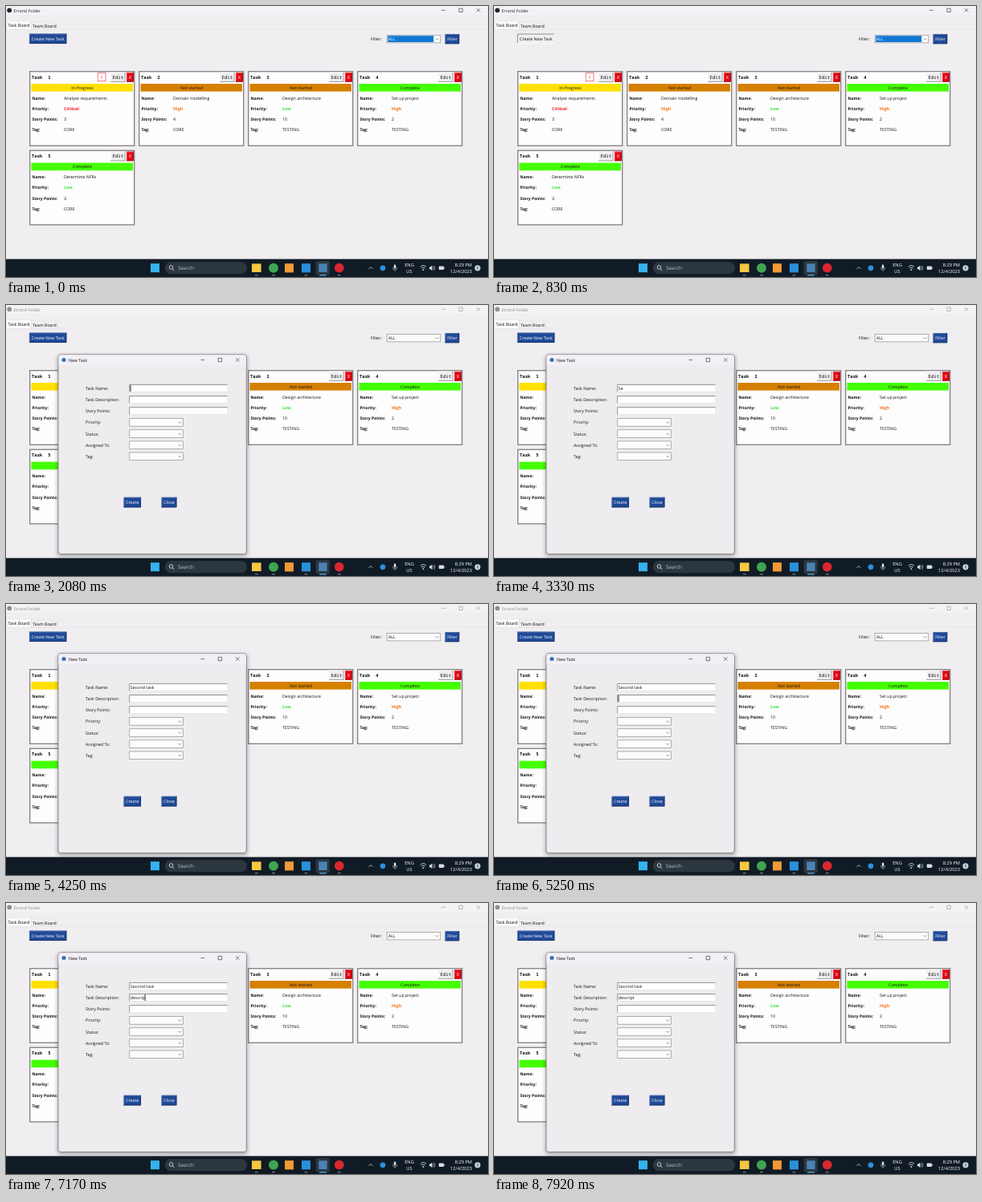
An HTML page for the animation above (8 s loop, 600 by 338 pixels).

```html
<!DOCTYPE html>
<html lang="en">
<head>
<meta charset="utf-8">
<title>Task board</title>
<style>
  html, body { margin: 0; width: 100%; height: 100%; overflow: hidden; background: #f0eef0; }
  svg { display: block; width: 100vw; height: 100vh; }
  text { font: 5.3px "Open Sans", "Noto Sans", sans-serif; white-space: pre; text-rendering: geometricPrecision; }
  .bold { font-weight: 700; }
  .label { font-weight: 700; font-size: 5.05px; }
  .mono { font: 5.7px "Noto Sans Mono", "DejaVu Sans Mono", monospace; }
  .head { font: 700 5.6px "Noto Sans Mono", "DejaVu Sans Mono", monospace; }
  .tray { font-size: 5.7px; }
  .search { font-size: 6.3px; }
</style>
</head>
<body>
<svg id="stage" viewBox="0 0 600 338"></svg>
<script>
const LOOP = 8000;
const BLUE = '#204a98', PANEL = '#f0eef0';
const STATUS = { 'In Progress': '#ffe000', 'Not started': '#d68000', 'Complete': '#44ff00' };
const PRIORITY = { Critical: '#f5141c', High: '#f47216', Low: '#3be03b' };

const rect = (x, y, w, h, fill, extra = '') =>
  `<rect x="${x}" y="${y}" width="${w}" height="${h}" fill="${fill}" ${extra}/>`;
const circle = (x, y, r, fill) => `<circle cx="${x}" cy="${y}" r="${r}" fill="${fill}"/>`;
const line = (d, color, width = 0.6) =>
  `<path d="${d}" fill="none" stroke="${color}" stroke-width="${width}"/>`;
// y is the middle of the capitals
const text = (x, y, str, { fill = '#111', cls = '', anchor = 'start', id = '' } = {}) =>
  `<text x="${x}" y="${y + 1.9}" fill="${fill}" class="${cls}" text-anchor="${anchor}" id="${id}">${str}</text>`;

// Box with light and dark edges, raised or sunken
function bevel(x, y, w, h, fill, light, dark) {
  const r = x + w, b = y + h;
  return rect(x, y, w, h, fill) +
    line(`M${x + .4} ${b}V${y + .4}H${r}`, light, .8) +
    line(`M${x} ${b - .4}H${r - .4}V${y}`, dark, .8);
}

const blueButton = (x, y, w, h, str) =>
  bevel(x, y, w, h, BLUE, '#5b7ab5', '#132c5c') +
  text(x + w / 2, y + h / 2, str, { fill: '#fff', anchor: 'middle' });

const combo = (x, y, w) =>
  rect(x, y, w, 9.6, '#fdfcfd', 'stroke="#8f8f92" stroke-width=".7"') +
  line(`M${x + w - 6} ${y + 4}l1.8 1.8 1.8 -1.8`, '#555');

const windowControls = (x, y, color) =>
  line(`M${x - 2.3} ${y}h4.6`, color) +
  line(`M${x + 19.4} ${y - 2.2}h4.4v4.4h-4.4z`, color) +
  line(`M${x + 41.3} ${y - 2.2}l4.4 4.4m0 -4.4l-4.4 4.4`, color);

function card(index, [status, name, priority, points, tag]) {
  const x = 29 + index % 4 * 136, y = 81 + Math.floor(index / 4) * 98.6;
  const rows = [['Name:', name], ['Priority:', priority], ['Story Points:', points], ['Tag:', tag]];
  return rect(x + .7, y + .7, 130, 92.6, '#fefdfe', 'stroke="#88868a" stroke-width="1.4"') +
    text(x + 3, y + 7.7, `Task  ${index + 1}`, { cls: 'head' }) +
    (priority === 'Critical'
      ? rect(x + 85.2, y + 2.7, 9.8, 10, '#fff', 'stroke="#e85a60" stroke-width=".8"') +
        text(x + 90.1, y + 7.6, '!', { cls: 'bold', fill: '#f01820', anchor: 'middle' })
      : '') +
    bevel(x + 101, y + 1.8, 18.5, 12, PANEL, '#fff', '#8a888c') +
    text(x + 110.3, y + 7.6, 'Edit', { cls: 'mono', anchor: 'middle' }) +
    bevel(x + 121, y + 2, 8.8, 11.6, '#e30613', '#f0656c', '#8c0710') +
    text(x + 125.4, y + 7.6, 'X', { cls: 'mono', fill: '#fff', anchor: 'middle' }) +
    rect(x + 2.5, y + 16, 126.5, 9.6, STATUS[status]) +
    text(x + 66, y + 20.6, status, { anchor: 'middle' }) +
    rows.map(([label, value], i) => {
      const mid = y + 33.6 + i * 13.2;
      const color = PRIORITY[value];
      return text(x + 3.4, mid, label, { cls: 'label' }) +
        text(x + 43, mid, value, color ? { cls: 'bold', fill: color } : {});
    }).join('');
}

const tasks = [
  ['In Progress', 'Analyse requirements', 'Critical', 3, 'CORE'],
  ['Not started', 'Domain modelling', 'High', 4, 'CORE'],
  ['Not started', 'Design architecture', 'Low', 10, 'TESTING'],
  ['Complete', 'Set up project', 'High', 2, 'TESTING'],
  ['Complete', 'Determine NFRs', 'Low', 3, 'CORE'],
];

function titleBar(id, background, ink) {
  return `<g id="${id}">` + rect(0, 0, 600, 11, background) + circle(4.2, 5.3, 2.9, ink) +
    text(9.5, 5.6, 'Errand Folder', { fill: ink }) + windowControls(544.5, 5.3, ink) + '</g>';
}

const board =
  rect(0, 0, 600, 338, PANEL) +
  titleBar('titleActive', '#f1f3f9', '#222') +
  titleBar('titleInactive', '#f3f2f4', '#8c8c8e') +
  rect(.5, 28.7, 599, .5, '#dddbde') +
  rect(31, 20, 34, 9, PANEL, 'stroke="#dcdadd" stroke-width=".5"') +
  rect(.5, 18.2, 30.5, 11, '#fbfafb', 'stroke="#dcdadd" stroke-width=".5"') +
  text(2.6, 23.6, 'Task Board') + text(33.2, 24.6, 'Team Board') +
  `<g id="buttonUp">${blueButton(29, 34.6, 46.3, 12.4, 'Create New Task')}</g>` +
  `<g id="buttonDown">${bevel(29, 34.6, 46.3, 12.4, PANEL, '#77757a', '#fff')}` +
  text(52.4, 41.1, 'Create New Task', { anchor: 'middle' }) + '</g>' +
  text(454, 41, 'Filter:') + combo(474.2, 36.3, 66.6) +
  `<g id="selected">${rect(475.3, 37.2, 57, 7.8, '#0f78d4')}${text(476, 41, 'ALL', { fill: '#fff' })}</g>` +
  text(476, 41, 'ALL', { id: 'unselected' }) +
  blueButton(546.6, 35, 17.6, 12.2, 'Filter') +
  tasks.map((task, i) => card(i, task)).join('');

const fieldLabels = ['Task Name:', 'Task Description:', 'Story Points:', 'Priority:', 'Status:', 'Assigned To:', 'Tag:'];
const fieldY = i => 104 + i * 14.13;

const dialog = '<g id="dialog">' +
  rect(64, 62.5, 236.5, 251, '#000', 'rx="4" opacity=".3" filter="url(#soft)"') +
  rect(65, 61.8, 234.3, 248.8, '#eeecef', 'rx="3.2" stroke="#77757a" stroke-width=".8"') +
  '<path d="M65.4 75.5V65q0 -2.8 2.8 -2.8H296q2.9 0 2.9 2.8V75.5z" fill="#f2eff5"/>' +
  circle(72, 68.5, 2.5, '#2f6fb0') + text(78, 68.7, 'New Task') +
  windowControls(244.8, 68.5, '#222') +
  fieldLabels.map((label, i) => text(99, fieldY(i) + .2, label) + (i < 3
    ? bevel(153.3, fieldY(i) - 5, 122.9, 9.8, '#fff', '#77757a', '#e2e0e3') +
      text(154.8, fieldY(i), '', { id: 'entry' + i })
    : combo(153.8, fieldY(i) - 4.8, 66.8))).join('') +
  rect(0, 0, .9, 8, '#111', 'id="caret"') +
  blueButton(146.6, 239.8, 21.4, 12.6, 'Create') +
  blueButton(193.6, 239.8, 18.8, 12.6, 'Close') + '</g>';

const GREY = '#d9dee2';
const taskbar =
  rect(0, 315.6, 600, 22.4, '#101b25') +
  rect(180, 321.2, 11, 11, '#35b2ee') +
  rect(197.6, 319.2, 102.4, 15, '#2b363f', 'rx="7.5"') +
  `<circle cx="205.6" cy="326" r="2.3" fill="none" stroke="${GREY}" stroke-width=".9"/>` +
  line('M207.2 327.8l2.2 2.4', GREY, .9) +
  text(214, 326.9, 'Search', { cls: 'search', fill: '#c3c9ce' }) +
  rect(385.6, 318, 17.4, 17.6, '#2b3640', 'rx="2"') +
  rect(306, 321.4, 11.6, 10.6, '#f7c741') +
  circle(333, 326.8, 6, '#3fa552') +
  rect(347, 321.2, 11, 11.2, '#f29a34') +
  rect(368, 321.2, 11, 11.2, '#2990dc') +
  rect(389.3, 321.4, 10.4, 10.6, '#4a82b4') +
  circle(414.8, 326.6, 5.9, '#d9262f') +
  [311.8, 333, 373.5, 414.8].map(x => rect(x - 2, 335.3, 4, 1, '#8f989f', 'rx=".5"')).join('') +
  rect(390, 335.2, 9, 1.2, '#5cb6ea', 'rx=".6"') +
  line('M451.6 327.8l2.3 -2.3 2.3 2.3', GREY, .8) +
  circle(469, 326.8, 3.4, '#2b8fe0') +
  rect(482.8, 322.6, 2.6, 5, GREY, 'rx="1.3"') +
  line('M481.4 326.4q0 2.8 2.7 2.8t2.7 -2.8M484.1 329.2v1.6', GREY) +
  text(502, 323.4, 'ENG', { cls: 'tray', fill: '#fff', anchor: 'middle' }) +
  text(502, 331.2, 'US', { cls: 'tray', fill: '#fff', anchor: 'middle' }) +
  line('M515.8 325.4q3.6 -3.6 7.2 0M517.2 327.2q2.2 -2 4.4 0', GREY, .9) + circle(519.4, 329.2, .9, GREY) +
  `<path d="M527 325.4h1.5l2 -2v6.8l-2 -2H527z" fill="${GREY}"/>` +
  line('M531.8 325q1.2 1.8 0 3.6M533 323.8q2 3 0 6', GREY) +
  rect(538.8, 324.4, 6.2, 4.6, GREY, 'rx=".8"') + rect(545.4, 325.8, .8, 1.8, GREY) +
  text(580, 323.4, '8:29 PM', { cls: 'tray', fill: '#fff', anchor: 'end' }) +
  text(580, 331.2, '12/4/2023', { cls: 'tray', fill: '#fff', anchor: 'end' }) +
  circle(587, 326.8, 3.6, '#c5d3dc') + rect(586.6, 325, .9, 3.6, '#2a3740');

document.getElementById('stage').innerHTML =
  '<defs><filter id="soft" x="-10%" y="-10%" width="120%" height="120%"><feGaussianBlur stdDeviation="2.6"/></filter></defs>' +
  board + dialog + taskbar;

const PRESS = 700, OPEN = 1080;
// time, field with the caret (-1: none), text of that field
const typing = [
  [OPEN, 0, ''], [1900, 0, ''], [2540, 0, 'S'], [2700, 0, 'Se'],
  ...[...'cond task'].map((_, i) => [3400 + i * 80, 0, 'Second task'.slice(0, 3 + i)]),
  [4180, -1, ''], [4700, 1, ''],
  ...[5800, 5960, 6160, 6480, 6680, 6860, 7060, 7270].map((time, i) => [time, 1, 'descript'.slice(0, i + 1)]),
];

const el = id => document.getElementById(id);
const show = (id, on) => el(id).setAttribute('visibility', on ? 'visible' : 'hidden');

function render(t) {
  const open = t >= OPEN, pressed = t >= PRESS && !open;
  el('dialog').style.display = open ? '' : 'none';
  show('titleActive', !open);
  show('titleInactive', open);
  show('selected', !open);
  show('unselected', open);
  show('buttonUp', !pressed);
  show('buttonDown', pressed);

  const past = typing.filter(step => step[0] <= t);
  for (const field of [0, 1]) {
    const step = past.filter(s => s[1] === field).pop();
    el('entry' + field).textContent = step ? step[2] : '';
  }
  const [time, field] = past.at(-1) || [0, -1];
  const caretOn = open && field >= 0 && (t - time) % 900 < 600;
  el('caret').style.display = caretOn ? '' : 'none';
  if (caretOn) {
    el('caret').setAttribute('x', 154.6 + el('entry' + field).getComputedTextLength());
    el('caret').setAttribute('y', fieldY(field) - 4.1);
  }
}

const start = performance.now();
function tick() {
  render((performance.now() - start) % LOOP);
  requestAnimationFrame(tick);
}
tick();
</script>
</body>
</html>
```
